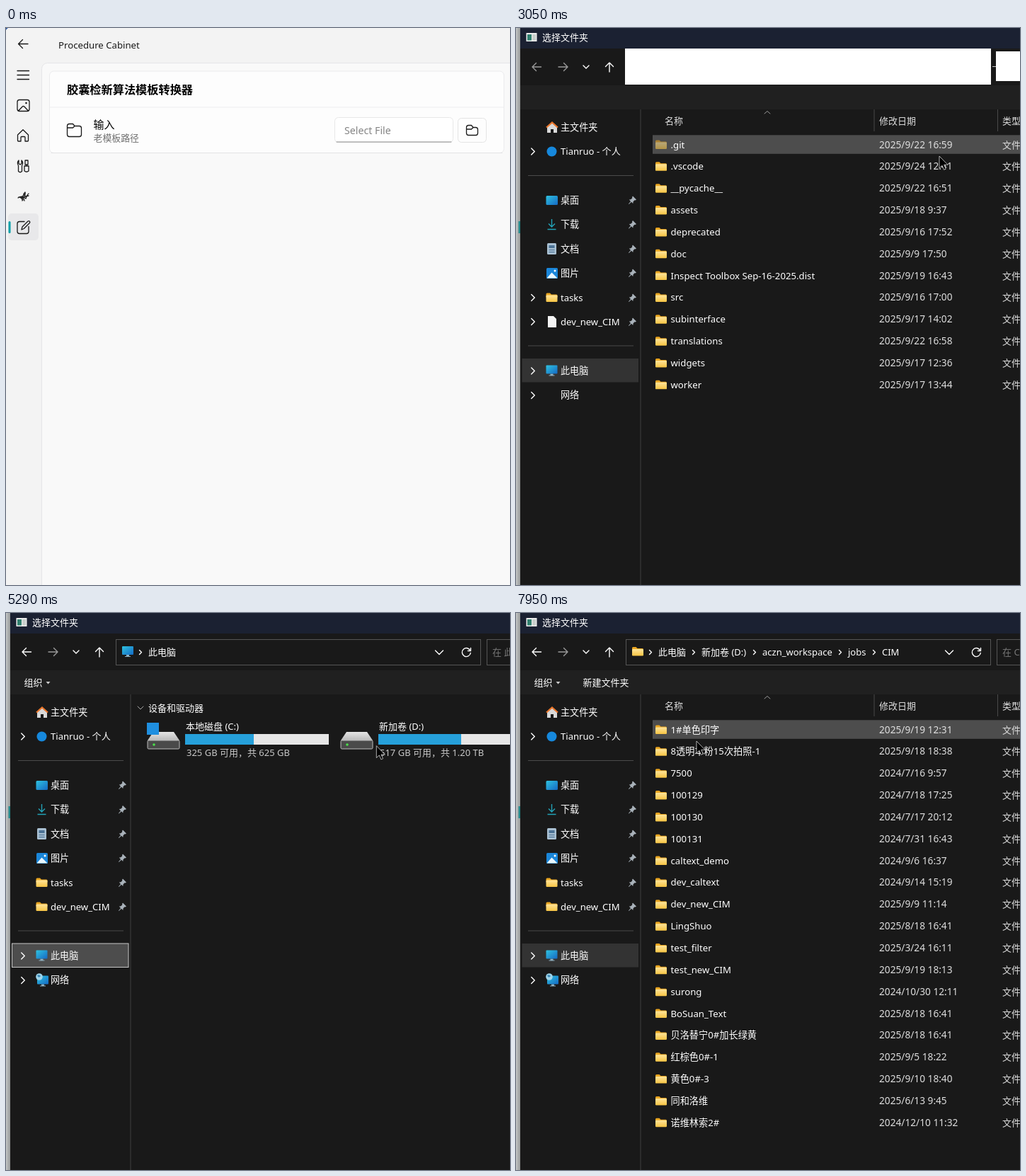
An HTML page for the animation above (8000 ms loop, 712 px wide and 787 px high).

```html
<!DOCTYPE html>
<html lang="zh-CN">
<head>
<meta charset="utf-8">
<title>Folder picker</title>
<style>
  html, body { margin: 0; width: 100%; height: 100%; overflow: hidden; background: #f3f3f3; }
  svg { display: block; width: 712px; height: 787px; }
  text { font-family: "Noto Sans", "Noto Sans CJK SC", "Noto Sans CJK", sans-serif; white-space: pre; }
  .line { fill: none; stroke: #1a1a1a; stroke-width: 1.3; stroke-linecap: round; stroke-linejoin: round; }
  .white { fill: none; stroke: #fff; stroke-width: 1.4; stroke-linecap: round; stroke-linejoin: round; }
</style>
</head>
<body>
<svg id="stage" viewBox="0 0 712 787" xmlns="http://www.w3.org/2000/svg">
  <defs>
    <linearGradient id="mica"><stop offset="0" stop-color="#edf2fd"/><stop offset=".2" stop-color="#f0f2f8"/><stop offset="1" stop-color="#f1f2f7"/></linearGradient>
    <linearGradient id="gold" x2="0" y2="1"><stop offset="0" stop-color="#ffe49a"/><stop offset="1" stop-color="#f7c443"/></linearGradient>
    <linearGradient id="screen" x2="1" y2="1"><stop offset="0" stop-color="#2fc3e0"/><stop offset="1" stop-color="#1569c4"/></linearGradient>
    <linearGradient id="metal" x2="0" y2="1"><stop offset="0" stop-color="#e4e4e4"/><stop offset="1" stop-color="#b9b9b9"/></linearGradient>
    <linearGradient id="edge"><stop offset="0" stop-color="#c3c6c6"/><stop offset="1" stop-color="#8d9090"/></linearGradient>
    <clipPath id="paneClip"><rect id="paneBox" y="90" width="50" height="220"/></clipPath>
    <g id="folder">
      <path d="M0 1.5Q0 0 1.5 0H5.5L7.5 2H14.500Q16 2 16 3.500V6H0Z" fill="#e9a520"/>
      <rect y="3" width="16" height="9.500" rx="1.200" fill="url(#gold)"/>
    </g>
    <g id="down" fill="none" stroke="#23a3b8" stroke-width="1.400"><path d="M7 0V11M2.500 6.500L7 11L11.500 6.500M1 14.500H13"/></g>
    <g id="monitor">
      <path d="M6 12H10V14H12V15H4V14H6Z" fill="#8fb0c0"/>
      <rect width="16" height="12" rx="1" fill="url(#screen)"/>
    </g>
    <g id="drive">
      <path d="M8 0H37L45 12H0Z" fill="url(#metal)"/>
      <rect y="12" width="45" height="12" rx="1.500" fill="#4a4a4a" stroke="#bdbdbd"/>
      <circle cx="9" cy="18" r="1.800" fill="#4be04b"/>
    </g>
    <path id="pin" d="M6 0L11 5L9.500 6L8.500 5.800L6.500 8L6.300 10.500L4 8.300L.5 11.500L0 11L3 7.500L.8 5L3.200 4.800L5.300 2.800L5 1.500Z" fill="#a9b2ba"/>
  </defs>
  <g id="app"></g>
  <g id="dialog"></g>
  <path id="cursor" d="M0 0V17L4 13.300L6.600 19.300L9.300 18.100L6.700 12.300H12Z" fill="#000" stroke="#d8d8d8" stroke-width=".8"/>
</svg>
<script>
const $ = id => document.getElementById(id);
const text = (x, y, s, size = 13, fill = '#fff', more = '') =>
  `<text x="${x}" y="${y}" font-size="${size}" fill="${fill}" ${more}>${s}</text>`;
const rect = (x, y, w, h, fill, more = '') =>
  `<rect x="${x}" y="${y}" width="${w}" height="${h}" fill="${fill}" ${more}/>`;
const line = (d, more = '') => `<path class="line" d="${d}" ${more}/>`;
const white = (d, more = '') => `<path class="white" d="${d}" ${more}/>`;
const use = (id, x, y, more = '') => `<use href="#${id}" transform="translate(${x} ${y})" ${more}/>`;
const chevron = (x, y, r, more) => white(`M${x - r / 2} ${y - r}l${r} ${r}l${-r} ${r}`, more);
const group = (id, body) => `<g id="${id}">${body}</g>`;

// ---- light application window ----
const outline = (x, y, w, h) =>
  line(`M${x} ${y + 3}q0 -3 3 -3h${w * .25}l2.500 3h${w * .75 - 8.5}q3 0 3 3v${h - 9}q0 3 -3 3h${6 - w}q-3 0 -3 -3zM${x} ${y + 5.5}h${w * .25 + 3}l2.500 -2.500`);

const appIcons =
  line('M31 22.500H17.500M23.500 16.500l-6 6l6 6') +
  line('M19 101.500h11q3 0 3 3v10q0 3 -3 3h-11q-3 0 -3 -3v-10q0 -3 3 -3zM18 116.500l5.200 -5.500q1.300 -1 2.600 0l5.200 5.500M28 105.500h1v1h-1z') +
  line('M16.500 151l7.500 -7.300l7.500 7.300v8q0 1 -1 1h-3.500v-5.500q0 -1 -1 -1h-4q-1 0 -1 1v5.500h-3.500q-1 0 -1 -1z') +
  line('M18 187v4.500l2 1.500l2 -1.500v-4.500q3 3 .500 7.500v8q-2.500 2.500 -5 0v-8q-2.500 -4.500 .500 -7.500zM27 187h4v6h-4zM26 195h6v7q-3 2.500 -6 0zM29 193v2') +
  line('M17 240q6 -4 11 1q2 -6 4 -7M18 239q7 -1 8 5M23 244q0 -7 4 -12q1 5 -3 8M20 239l4 4M25 234l2 4M27 238l5 -1M23 238l5 3') +
  line('M26 273.500h-7q-3 0 -3 3v11q0 3 3 3h10q3 0 3 -3v-7M22 285l1 -4l8 -8q1.500 -1 2.500 .300q.800 1 -.200 2.200l-8 8z');

const labels = ['Calibration', 'Run', 'Tools', 'Auto Tuning', 'CIM Converter']
  .map((s, i) => text(50.5, 115 + i * 43, s, 13.9, '#1a1a1a')).join('');

$('app').innerHTML =
  rect(0, 0, 712, 787, '#f3f3f3') +
  rect(0, 0, 712, 787, 'url(#mica)', 'id="tint"') +
  '<path id="corner" d="M0 0H3Q1 1 0 3Z"/>' +
  rect(3, 47, 43, 38, '#e7e9ee', 'rx="5" id="burgerHover"') +
  line('M16 60.500H32.500M16 66.500H32.500M16 72.500H32.500', 'id="burger"') +
  rect(3, 262, 43, 38, '#e8e8ea', 'rx="5" id="selected"') +
  rect(3.5, 273, 3, 17, '#009faa', 'rx="1.500"') +
  appIcons + text(74, 28.5, 'Procedure Cabinet', 13.2, '#1a1a1a') +
  `<g clip-path="url(#paneClip)">${group('labels', labels)}</g>` +
  group('content',
    rect(50.5, 49.5, 1200, 900, '#f9f9f9', 'rx="8" stroke="#e5e5e8" id="panel"') +
    rect(61.5, 61, 642, 115.5, '#fdfdfd', 'rx="6" stroke="#ebebed"') +
    line('M64 176.500H701', 'style="stroke:#e2e2e4;stroke-width:1"') +
    rect(62, 111.5, 641, 1, '#ededef') +
    text(86, 92.5, '胶囊检新算法模板转换器', 16.2, '#000', 'font-weight="700"') +
    outline(86.5, 135.5, 20, 18) +
    text(123.5, 141.5, '输入', 15, '#000') +
    text(123.5, 160, '老模板路径', 12.9, '#707070') +
    rect(464.5, 126.5, 167, 35, '#fff', 'rx="5" stroke="#e8e8e8"') +
    line('M467 161H629', 'style="stroke:#8a8a8a;stroke-width:1"') +
    text(478, 150, 'Select File', 14.2, '#858585') +
    rect(638.5, 127.5, 40, 34, '#fdfdfd', 'rx="5" stroke="#e4e4e4"') +
    outline(650.5, 137.5, 16, 14));

// ---- dark folder dialog ----
const PITCH = 30.85;
const views = {
  repo: { at: 2740, crumbs: 3, extra: 'repo', search: 're', wait: 0, rows: `.git|2025/9/22 16:59
.vscode|2025/9/24 12:41
__pycache__|2025/9/22 16:51
assets|2025/9/18 9:37
deprecated|2025/9/16 17:52
doc|2025/9/9 17:50
Inspect Toolbox Sep-16-2025.dist|2025/9/19 16:43
src|2025/9/16 17:00
subinterface|2025/9/17 14:02
translations|2025/9/22 16:58
widgets|2025/9/17 12:36
worker|2025/9/17 13:44` },
  pc: { at: 4160, crumbs: 1, search: '此', rows: '' },
  disk: { at: 5590, crumbs: 2, search: '新', wait: 60, rows: `AC|2025/8/18 16:34
aczn_workspace|2025/9/9 16:44
DeliveryOptimization|2025/8/18 16:34
HLZN_INSPECTION_DATA|2025/2/24 18:04
image_data|2025/9/11 14:03
log_backup|2025/8/15 14:02
offline_regression|2024/8/2 14:22
Program Files|2025/9/23 16:14
Program Files (x86)|2025/8/27 13:20
repo|2025/9/16 17:21
tdd-files|2025/8/18 16:05
WindowsApps|2025/9/23 19:43
WpSystem|2025/8/18 17:49
WUDownloadCache|2025/9/10 17:12
下载|2025/9/24 16:31` },
  space: { at: 6130, crumbs: 3, search: 'ac', wait: 80, rows: `backup|2025/8/18 16:41
config|2025/8/18 16:41
data|2025/8/20 13:35
jobs|2025/9/9 16:44
logs|2025/9/10 14:07` },
  jobs: { at: 6910, crumbs: 4, search: 'jo', wait: 240, rows: `CIM|2025/9/11 13:59
SIM|2025/9/10 14:07
SLAT|2025/8/22 11:41
BASM|2025/8/20 13:35
BIM|2025/8/18 16:41
TCIM|2025/8/18 16:41
convert_yolo|2024/6/16 17:09
2-color|2024/6/13 19:31
convert_yolo_test|2024/6/6 17:10
fibrolane_params|2024/5/2 18:40
夜间美白|2024/5/2 15:18
TangMoor_V|2024/5/2 14:52
warmup_debug|2024/5/2 11:04
test|2024/4/27 22:34
041224|2024/4/13 23:14
pillnorvia|2024/4/4 22:49
ShuNaBo|2024/4/4 22:36
FenTao|2024/2/27 10:26
12cams|2024/2/4 23:10
SuoBeng|2024/2/2 10:33
test_job|2024/1/31 13:47` },
  cim: { at: 7880, crumbs: 5, search: 'C', wait: 50, rows: `1#单色印字|2025/9/19 12:31
8透明本粉15次拍照-1|2025/9/18 18:38
7500|2024/7/16 9:57
100129|2024/7/18 17:25
100130|2024/7/17 20:12
100131|2024/7/31 16:43
caltext_demo|2024/9/6 16:37
dev_caltext|2024/9/14 15:19
dev_new_CIM|2025/9/9 11:14
LingShuo|2025/8/18 16:41
test_filter|2025/3/24 16:11
test_new_CIM|2025/9/19 18:13
surong|2024/10/30 12:11
BoSuan_Text|2025/8/18 16:41
贝洛替宁0#加长绿黄|2025/8/18 16:41
红棕色0#-1|2025/9/5 18:22
黄色0#-3|2025/9/10 18:40
同和洛维|2025/6/13 9:45
诺维林索2#|2024/12/10 11:32` }
};

const path = [['此电脑', 201], ['新加卷 (D:)', 262], ['aczn_workspace', 348], ['jobs', 469], ['CIM', 517]];

function address(name, v) {
  let out = name === 'pc' ? use('monitor', 164, 47)
    : name === 'disk' ? `<g transform="translate(164 50) scale(.36)">${use('drive', 0, 0)}</g>`
    : use('folder', 164, 48);
  path.slice(0, v.crumbs).forEach(([s, x], i) => {
    out += chevron(x - 11, 55.5, 3) + text(x, 59.5, i === 2 && v.extra || s);
  });
  if (name === 'disk') out += chevron(337, 55.5, 3);
  return out + text(687, 60, '在 ' + v.search, 13, '#777');
}

function fileList(name, rows) {
  const sort = name === 'jobs' ? 'M589.500 117l4 3.500l4 -3.500' : 'M351 121l4 -3.500l4 3.500';
  let out = text(210, 135.5, '名称', 13, '#ddd') + text(513, 135.5, '修改日期', 13, '#ddd') +
    text(687, 135.5, '类型', 13, '#ddd') + rect(505.5, 115, 1, 31, '#4a4a4a') + rect(680, 115, 1, 31, '#4a4a4a') +
    white(sort, 'style="stroke:#999;stroke-width:1"');
  rows.forEach((row, i) => {
    const [label, date] = row.split('|'), y = 169.5 + i * PITCH;
    out += (label === '下载' ? use('down', 198, y - 13) : use('folder', 197, y - 11, label === '.git' ? 'opacity=".6"' : '')) +
      text(218.5, y, label, 13.2) + text(513, y, date, 13.7, '#dedede') + text(687, y, '文件夹', 13, '#dedede');
  });
  return out;
}

const diskTile = (x, label, used, note) => use('drive', x + 7, 168) +
  text(x + 61, 164.5, label) + rect(x + 60, 171, 203, 15, '#e6e6e6') + rect(x + 60, 171, used, 15, '#26a0da') +
  text(x + 62, 201.5, note, 13, '#c8c8c8');

const drives = white('M186 132l4 4l4 -4', 'style="stroke:#aaa;stroke-width:1"') + text(201, 139, '设备和驱动器') +
  diskTile(193, '本地磁盘 (C:)', 97, '325 GB 可用，共 625 GB') +
  diskTile(466, '新加卷 (D:)', 117, '517 GB 可用，共 1.20 TB') + rect(199, 155, 17, 17, '#1f8fe0');

const nav = [
  [140, '主文件夹', '<path d="M44 139v9h5v-5h4v5h5v-9l-7 -6z" fill="#d9d9d9"/><path d="M43 140.500l8 -7l8 7" fill="none" stroke="#e8752a" stroke-width="2.200"/>'],
  [174, 'Tianruo - 个人', '<circle cx="50.500" cy="174.500" r="7" fill="#1688dc"/>'],
  [243, '桌面', rect(42.5, 237, 16.5, 13, 'url(#screen)', 'rx="1.500"')],
  [277.5, '下载', use('down', 43.5, 270)],
  [312, '文档', rect(44, 304, 13, 16, '#a9c0d2', 'rx="1.500"') + rect(46.500, 307, 8, 4, '#4c7396') + rect(46.500, 313, 8, 1.200, '#4c7396') + rect(46.500, 316, 8, 1.200, '#4c7396')],
  [346, '图片', rect(43, 339, 16, 15, '#1a86d9', 'rx="1.500"') + '<path d="M43.500 353.500l7 -8l8 8z" fill="#eaf6ff"/><circle cx="55" cy="343" r="1.500" fill="#fff"/>'],
  [381, 'tasks', use('folder', 42.5, 374.5)],
  [415, 'dev_new_CIM', group('newFolder', use('folder', 42.5, 408.5)) + '<path id="newFile" d="M45 407h8l4 4v12h-12z" fill="#f4f4f4"/>'],
  [484, '此电脑', use('monitor', 42.5, 476.5)],
  [518.5, '网络', group('netIcon', use('monitor', 44, 512.5) + '<circle cx="47" cy="514" r="4.800" fill="#9fd4ea"/><path d="M44 512q3 -2 5 1q-3 4 -5 -1z" fill="#3b87b5"/>')]
];

const navList = nav.map(([y, s, icon], i) => icon + text(63, y + 4.8, s, 13.1) +
  (i > 1 && i < 8 ? use('pin', 159, y - 5.5) : '') +
  (i === 1 || i > 7 ? chevron(24, y + .5, 4.5) : '')).join('');

$('dialog').innerHTML =
  rect(0, 0, 7, 787, 'url(#edge)') + rect(3.5, 273, 3, 17, '#23898c') +
  rect(6, 0, 706, 787, '#191919') + rect(6, 0, 706, 29, '#1b2132') + rect(6, 81, 706, 34, '#202020') +
  rect(175, 115, 2, 672, '#2c2c2c') +
  rect(14.5, 7, 15, 12, '#eee') + rect(16, 9, 6, 8.5, '#2f7f6e') + rect(23, 9, 5, 8.500, '#c9cfcc') +
  text(37, 17.8, '选择文件夹') +
  white('M35.500 55H23M28.500 49.500l-5.500 5.500l5.500 5.500', 'id="back"') +
  white('M60 55H73M67.500 49.500l5.500 5.500l-5.500 5.500', 'style="stroke:#9a9a9a"') +
  white('M95 53l4 4l4 -4') + white('M132 62V49M126.500 54.500l5.500 -5.500l5.500 5.500') +
  rect(155.5, 37.5, 515, 36, 'none', 'stroke="#555"') + rect(679.5, 37.5, 60, 36, 'none', 'stroke="#555"') +
  white('M606.500 53l5.500 5.500l5.500 -5.500') + white('M656 53.500a6 6 0 1 0 .300 3M656.500 49.500v4h-4') +
  group('organize', text(25.5, 103, '组织') + '<path d="M56.500 97h6l-3 3.500z" fill="#ccc"/>') +
  group('newDir', text(94.5, 103, '新建文件夹')) +
  rect(17, 208, 149, 1, '#4a4a4a') + rect(17, 448.5, 149, 1, '#4a4a4a') +
  rect(8.5, 467, 164.5, 33.500, '#333', 'id="navSelected"') + rect(8.5, 0, 164.5, 33.5, '#2d2d2d', 'id="navHover"') +
  navList + group('early', chevron(24, 381, 4.5) + chevron(24, 415, 4.5)) +
  rect(193, 0, 268, 27, '#4d4d4d', 'id="hover"') +
  Object.entries(views).map(([name, v]) => {
    v.rows = v.rows ? v.rows.split('\n') : [];
    return group('v_' + name, address(name, v) + (name === 'pc' ? drives : fileList(name, v.rows)));
  }).join('') +
  group('blank', rect(154, 29, 517, 51, '#fff') + rect(673, 54, 5, 1, '#ccc') + rect(678, 33, 34, 42, '#fff'));

// ---- motion: time, x, y, bow of the path leading here ----
const track = [
  [240, -14, 140, 0], [700, 26, 64, 0], [1800, 26, 64, 0], [2490, 649, 142, 97], [2740, 649, 142, 0],
  [3050, 598, 181, 0], [3130, 598, 181, 0], [3440, 480, 288, 0], [3510, 480, 288, 0], [3990, 92, 488, 0],
  [4160, 92, 488, 0], [4380, 358, 193, 0], [4980, 358, 193, 0], [5370, 543, 187, 0], [5650, 543, 187, 0],
  [5950, 282, 203, 0], [6200, 282, 203, 0], [6700, 254, 267, 0], [7100, 254, 267, 0], [7300, 254, 326, 0],
  [7700, 255, 181, 0], [8000, 255, 181, 0]
];

function pointer(t) {
  const i = track.findIndex(k => k[0] > t);
  if (i < 1) return [-30, 140];
  const [t0, x0, y0] = track[i - 1], [t1, x1, y1, bow] = track[i];
  const u = (t - t0) / (t1 - t0), e = u * u * (3 - 2 * u);
  return [x0 + (x1 - x0) * e, y0 + (y1 - y0) * e + bow * Math.sin(Math.PI * e)];
}

const show = (id, on) => $(id).style.display = on ? '' : 'none';
const set = (id, attrs) => { for (const k in attrs) $(id).setAttribute(k, attrs[k]); };
const between = (t, a, b) => t >= a && t < b;
const outQuad = (t, from) => { const u = Math.min(1, Math.max(0, (t - from) / 150)); return u * (2 - u); };

function drawApp(t, x, y) {
  const open = outQuad(t, 860) - outQuad(t, 1410), active = t >= 700;
  show('tint', active);
  set('corner', { fill: active ? '#555' : '#2b57a5' });
  set('panel', { fill: active ? '#f8f9fb' : '#f9f9f9' });
  show('burgerHover', between(x, 3, 46) && between(y, 47, 85));
  $('burger').style.stroke = between(t, 780, 860) || between(t, 1330, 1410) ? '#777' : '';
  set('selected', { width: 43 + 292 * open });
  set('paneBox', { width: 46 + 294 * open });
  show('labels', open > 0);
  set('content', { transform: `translate(${294 * open} 0)` });
}

function drawDialog(t, x, y) {
  const name = Object.keys(views).filter(k => t >= views[k].at).pop(), view = views[name];
  const loaded = t >= 3130, pc = name === 'pc';
  for (const k in views) show('v_' + k, k === name);
  show('blank', !loaded);
  show('early', !loaded);
  show('newFile', !loaded);
  show('newFolder', loaded);
  show('netIcon', loaded);
  show('organize', loaded);
  show('newDir', loaded && !pc);
  $('back').style.stroke = t < 4160 ? '#9a9a9a' : '';

  const focused = between(t, 4160, 5520), item = nav.findIndex(n => Math.abs(y - n[0]) < 17);
  const onNav = between(x, 8, 173) && item >= 0;
  set('navSelected', { fill: focused || onNav && item === 8 ? '#4d4d4d' : '#333', stroke: focused ? '#c8c8c8' : 'none' });
  show('navHover', onNav && item !== 8);
  if (onNav) set('navHover', { y: nav[item][0] - 17 });

  if (pc) {
    const onD = t >= 5520;
    show('hover', onD || between(x, 193, 461) && between(y, 149, 208));
    set('hover', { x: onD ? 466 : 193, y: 149.5, width: 268, height: 58.5, stroke: 'none' });
  } else {
    const row = Math.floor((y - 151.3) / PITCH), picked = between(t, 5950, 6130);
    show('hover', x >= 193 && row >= 0 && row < view.rows.length && t >= view.at + view.wait);
    set('hover', { x: 193, y: 151.3 + row * PITCH, width: 530, height: 26.5,
      fill: picked ? '#555' : '#4d4d4d', stroke: picked ? '#a8a8a8' : 'none' });
  }
}

const start = performance.now();
function frame() {
  const t = (performance.now() - start) % 8000, [x, y] = pointer(t), dialog = t >= 2740;
  show('app', !dialog);
  show('dialog', dialog);
  if (dialog) drawDialog(t, x, y); else drawApp(t, x, y);
  set('cursor', { transform: `translate(${x} ${y})` });
  requestAnimationFrame(frame);
}
frame();
</script>
</body>
</html>
```
